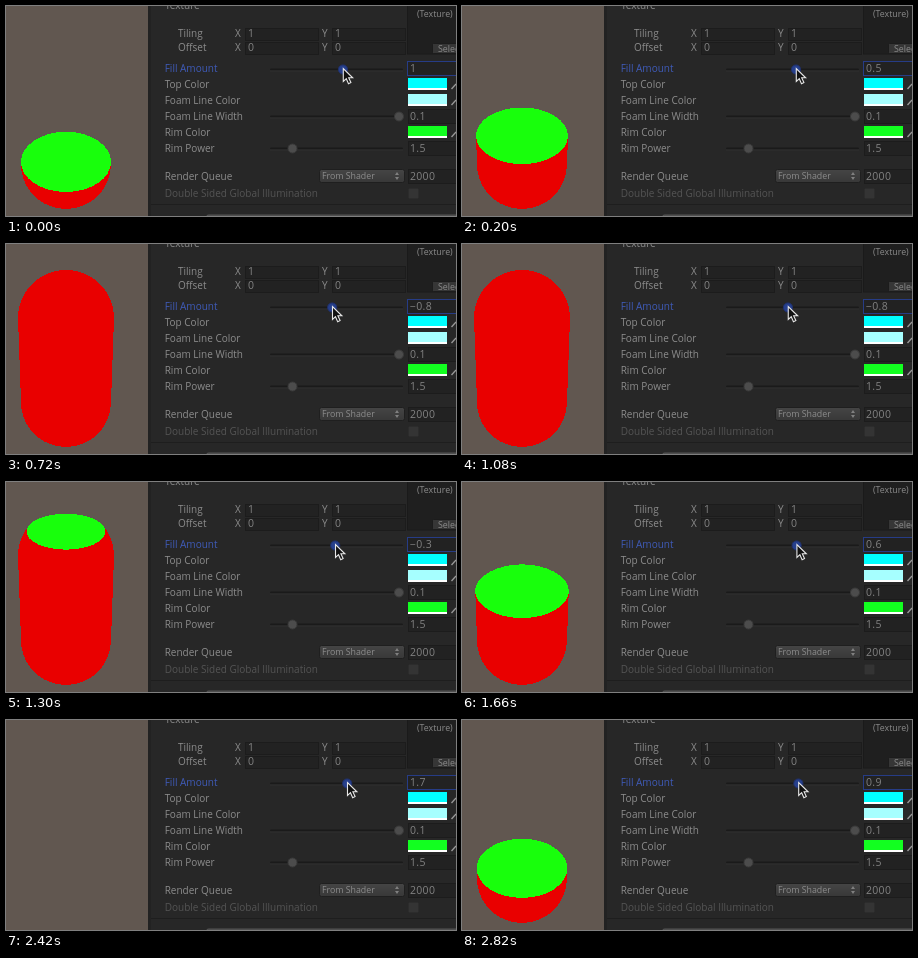
An HTML page for the animation above (2.84 s loop, 450 px wide and 210 px high).

```html
<!DOCTYPE html>
<html lang="en">
<head>
<meta charset="utf-8">
<title>Fill amount</title>
<style>
  html, body { margin: 0; width: 100%; height: 100%; overflow: hidden; background: #272727; }
  svg { display: block; width: 450px; height: 210px; }
  text { font: 10px "Open Sans", sans-serif; fill: #8c8c8c; }
  .num { font-size: 10.5px; letter-spacing: .3px; fill: #828282; }
  .small { font-size: 8.8px; }
  .dim { fill: #545454; }
  .hot { fill: #3f5bb8; }
  #body, #top { shape-rendering: crispEdges; }
</style>
</head>
<body>
<svg viewBox="0 0 450 210">
  <defs>
    <clipPath id="below"><rect id="cut" x="0" y="0" width="141" height="210"/></clipPath>
    <linearGradient id="btn" x2="0" y2="1">
      <stop offset="0" stop-color="#454545"/><stop offset="1" stop-color="#383838"/>
    </linearGradient>
  </defs>
  <rect width="142" height="210" fill="#615750"/>
  <path id="body" fill="#e90000" clip-path="url(#below)"/>
  <ellipse id="top" cx="60" fill="#18ff0c"/>
  <rect x="142" width="308" height="210" fill="#272727"/>
  <rect x="142" width="3" height="210" fill="#222"/>
  <g id="panel"></g>
  <circle id="knob" cy="63.5" r="4.6" fill="#263f8c" stroke="#20306a"/>
  <text id="value" class="num" x="404" y="66"></text>
  <path id="cursor" d="M0 0V13L3 10.2L5.2 15.2L7.6 14.1L5.4 9.3H9.4Z" fill="#111" stroke="#e8e8e8" stroke-width="1.1"/>
</svg>
<script>
const LOOP = 2840;
const $ = id => document.getElementById(id);

// Static inspector panel
const parts = [];
const text = (s, x, y, cls = "") => parts.push(`<text x="${x}" y="${y}" class="${cls}">${s}</text>`);
const rect = (x, y, w, h, fill, stroke = "none", r = 0) =>
  parts.push(`<rect x="${x}" y="${y}" width="${w}" height="${h}" rx="${r}" fill="${fill}" stroke="${stroke}"/>`);
const path = (d, attrs) => parts.push(`<path d="${d}" ${attrs}/>`);
const field = (x, y, w, h, edge = "#1c1c1c") => rect(x + .5, y + .5, w, h, "#222", edge);

function slider(y, knobX) {
  rect(264, y - 1, 133, 2, "#1a1a1a", "none", 1);
  rect(264, y + 1, 133, 1, "#303030");
  if (knobX) parts.push(`<circle cx="${knobX}" cy="${y}" r="4.5" fill="#4c4c4c" stroke="#3a3a3a"/>`);
}

function swatch(y, color) {
  rect(402, y, 39, 10, color);
  rect(402, y + 10, 39, 2, "#fff");
  path(`M445.5 ${y + 11}L450 ${y + 6}`, 'stroke="#999" stroke-width="1.3"');
}

text("Texture", 159, 3);
[["Tiling", 1, 31], ["Offset", 0, 45]].forEach(([name, n, y]) => {
  text(name, 172, y);
  [["X", 229], ["Y", 316]].forEach(([axis, x]) => {
    text(axis, x, y);
    field(x + 10, y - 9, 73, 12);
    text(n, x + 13, y, "num");
  });
});

rect(401.5, -1, 50, 49, "#1f1f1f", "#1a1a1a");
text("None", 414, -1, "small");
text("(Texture)", 411, 11, "small");
rect(426.5, 37.5, 30, 10, "#363636", "#1c1c1c", 1);
text("Select", 432, 46, "small");

text("Fill Amount", 158.7, 66, "hot");
["Top Color", "Foam Line Color", "Foam Line Width", "Rim Color", "Rim Power"]
  .forEach((name, i) => text(name, 158.7, 82 + 16 * i));
slider(63.5);
slider(110.5, 393);
slider(142.5, 286.5);
swatch(72, "#00ffff");
swatch(88, "#a6ffff");
swatch(120, "#12ff20");

field(401, 55, 60, 14, "#263c86");
[["0.1", 114], ["1.5", 146], ["2000", 174]].forEach(([n, y]) => {
  field(402, y - 11, 60, 14);
  text(n, 404, y, "num");
});

text("Render Queue", 158.7, 174);
rect(313.5, 163.5, 85, 13, "url(#btn)", "#1f1f1f", 2);
text("From Shader", 316, 173, "small");
path("M389 169L391 166L393 169ZM389 171L391 174L393 171Z", 'fill="#808080"');
text("Double Sided Global Illumination", 158.7, 191, "dim");
rect(402.5, 182.5, 10, 10, "#343434", "#2c2c2c", 1);
rect(145, 198, 305, 1, "#1e1e1e");
rect(200.5, 209, 260, 10, "#484848", "#555", 2);
$("panel").innerHTML = parts.join("");

// Capsule: upper and lower spheres joined by a slightly tapered wall
const UP = { y: 74, r: 48 }, LOW = { y: 158, r: 45 };
$("body").setAttribute("d",
  `M12 ${UP.y}A48 48 0 0 1 108 ${UP.y}L105 ${LOW.y}A45 45 0 0 1 15 ${LOW.y}Z`);

// Pairs of time and value
const AMOUNT = [[0, 1], [400, 0], [720, -.8], [860, -1.1], [960, -1.1], [1100, -.8], [1300, -.3],
  [1660, .6], [2090, 1.8], [2340, 1.8], [2420, 1.7], [2820, .9], [LOOP, .86]];
const LEVEL = [[0, 156], [200, 130], [400, 93], [540, 46], [600, 28], [1130, 28], [1300, 49.5],
  [1660, 109], [2060, 194], [2570, 194], [2820, 148.5], [LOOP, 145]];

function at(keys, t) {
  const i = keys.findIndex(k => k[0] > t);
  const [t0, a] = keys[i - 1], [t1, b] = keys[i];
  return a + (b - a) * (t - t0) / (t1 - t0);
}

function drawLiquid(y) {
  const tilt = .455 + (y - 49.5) * .002;   // surface looks rounder lower down
  const cos2 = 1 - tilt * tilt;
  const ball = y < UP.y ? UP : y > LOW.y ? LOW : null;
  let rx, cut = y;
  if (ball) {
    const d = y - ball.y;
    rx = Math.sqrt(Math.max(0, ball.r ** 2 - d * d / cos2));
    cut = ball.y + d / cos2;               // where the rim touches the outline
  } else {
    rx = UP.r + (LOW.r - UP.r) * (y - UP.y) / (LOW.y - UP.y);
  }
  $("cut").setAttribute("y", cut);
  $("top").setAttribute("cy", y);
  $("top").setAttribute("rx", rx);
  $("top").setAttribute("ry", rx * tilt);
}

function draw(now) {
  const t = now % LOOP;
  const v = at(AMOUNT, t);
  const x = 331 + 6 * v;
  const shown = Math.round(v * 10) / 10;
  $("knob").setAttribute("cx", x);
  $("cursor").setAttribute("transform", `translate(${x + .3} 62.5)`);
  $("value").textContent = (shown < 0 ? "\u2212" : "") + Math.abs(shown);
  drawLiquid(at(LEVEL, t));
}

const start = performance.now();
function frame() {
  draw(performance.now() - start);
  requestAnimationFrame(frame);
}
frame();
</script>
</body>
</html>
```
